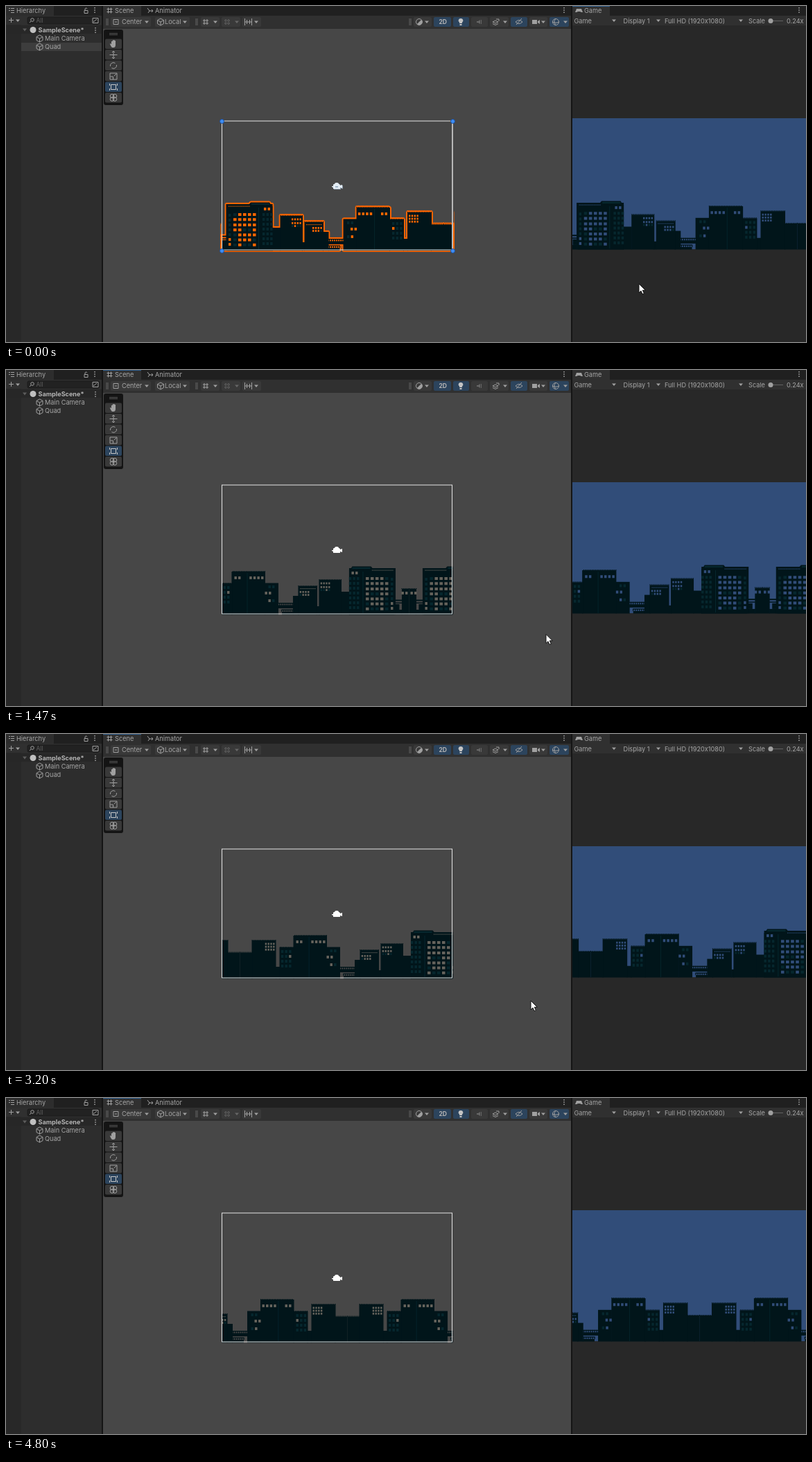
An HTML page with a canvas that plays this animation: 1154 px wide and 485 px high, repeating every 4.94 s.

```html
<!DOCTYPE html>
<html lang="en">
<head>
<meta charset="utf-8">
<title>Scrolling skyline in an editor</title>
<style>
html, body { margin: 0; width: 100%; height: 100%; overflow: hidden; background: #202020; }
svg, canvas { position: absolute; left: 0; top: 0; width: 1154px; height: 485px; display: block; }
text { font: 9.2px Inter, Roboto, sans-serif; fill: #a6a6a6; }
.bold { font-weight: 700; font-size: 9.1px; fill: #b4b4b4; }
.small { font-size: 8.5px; }
.line { fill: none; stroke: #a0a0a0; stroke-width: 1; }
.dim { opacity: .45; }
.icon { fill: #a0a0a0; }
.on { fill: #2c445d; }
.btn { fill: #393939; }
.picked .idle, body:not(.picked) .picked-only { display: none; }
</style>
</head>
<body class="picked">
<svg viewBox="0 0 1154 485">
  <defs>
    <path id="caret" class="icon" d="M-3-1.5h6L0 2z"/>
    <path id="kebab" class="icon" d="M-.8-4h1.6v1.6h-1.6zM-.8-.8h1.6v1.6h-1.6zM-.8 2.4h1.6v1.6h-1.6z"/>
    <path id="cube" class="line" d="M0-5 4.5-2.5v5L0 5l-4.5-2.5v-5zM-4.5-2.5 0 0l4.5-2.5M0 0v5"/>
    <path id="grid" class="line" d="M-2-4v8M2-4v8M-4-2h8M-4 2h8"/>
    <path id="cam" d="M-7-1h2v-2q0-1 2-1 0-2 3-2t3 2q2 0 2 2l3-1v5l-3-1v2h-10v-2l-2-1z"/>
  </defs>

  <!-- hierarchy -->
  <path fill="#2d2d2d" d="M0 0h138v485H0z"/>
  <path fill="#202020" d="M69 0h69v14H69z"/>
  <path fill="#303030" d="M0 14h138v13H0z"/>
  <path fill="#282828" d="M0 27h22v458H0z"/>
  <path fill="#272727" d="M0 28h138v12H0z"/>
  <path class="picked-only" fill="#3d3d3d" d="M22 53h116v12H22z"/>
  <path class="line" d="M4 3.5h2M7 3.5h5M4 6.5h2M7 6.5h5M7 9.5h5"/>
  <text x="15" y="10">Hierarchy</text>
  <path class="line" d="M113 6.5h5v4h-5zM114 6V4q1.5-2.5 3 0"/>
  <use href="#kebab" x="128" y="6"/>
  <path class="line" d="M4 20.5h7M7.5 17v7"/><use href="#caret" x="17" y="21"/>
  <rect x="31" y="16" width="104" height="10" rx="2" fill="#222" stroke="#1a1a1a"/>
  <path class="line" d="M34 24l2-2"/><circle class="line" cx="38" cy="20" r="2.3"/>
  <text x="43.5" y="24" class="dim small">All</text>
  <path class="line" d="M125 17.5h8v7h-8zM126 23l5-4"/>
  <path class="icon dim" d="M24 32.5h6l-3 4z"/>
  <circle cx="39" cy="34.5" r="4.5" fill="#c0c0c0"/>
  <text x="46.5" y="38" class="bold">SampleScene*</text>
  <use href="#kebab" x="129" y="35"/>
  <use href="#cube" x="48.5" y="47"/><text x="56" y="50">Main Camera</text>
  <use href="#cube" x="48.5" y="59"/><text x="56" y="62">Quad</text>

  <!-- scene -->
  <path fill="#474747" d="M140 32h675v453H140z"/>
  <path fill="#303030" d="M140 0h55v14h620v19H140z"/>
  <path class="idle" fill="#32608f" d="M140 0h55v1h-55z"/>
  <use href="#grid" x="149.5" y="6.5"/><text x="157" y="10">Scene</text>
  <path class="line" d="M204 3l3 4h4M207 7l-2 3M210 5l2 2-2 2"/><text x="215" y="10">Animator</text>
  <use href="#kebab" x="805" y="6"/>
  <g id="buttons"></g>
  <path class="line dim" d="M145 18v10M147 18v10M274 18v10M276 18v10M582 18v10M584 18v10"/>
  <path class="line" d="M155 19.5h7v7h-7zM157 23h3"/><text x="167" y="26">Center</text><use href="#caret" x="203" y="23"/>
  <use href="#cube" x="223" y="23"/><text x="229" y="26">Local</text><use href="#caret" x="258" y="23"/>
  <use href="#grid" x="288" y="23"/><use href="#caret" x="302" y="23"/>
  <use href="#grid" x="319" y="23" class="dim" stroke-dasharray="2 1"/><use href="#caret" x="333" y="23" class="dim"/>
  <path class="line" d="M344.5 18v10M354.5 18v10M347.5 20v6M351.5 20v6M345 23h9"/><use href="#caret" x="361" y="23"/>
  <circle class="line" cx="596" cy="23" r="4.5"/><path class="icon" d="M593 26a4 4 0 0 0 6-6z"/><use href="#caret" x="607" y="23"/>
  <text x="624.5" y="26" class="bold small">2D</text>
  <path fill="#c4c4c4" d="M656 18a3 3 0 0 1 2 5.5v1.500h-4v-1.500a3 3 0 0 1 2-5.500zM654.5 26h3v2h-3z"/>
  <path class="icon dim" d="M679 22h2l3-2v6l-3-2h-2zM685 20h1v6h-1z"/>
  <path class="line" d="M702 23l4-2 4 2-4 2zM702 25.5l4 2 4-2M707 19h4v3"/><use href="#caret" x="720" y="23"/>
  <path class="line" d="M735 23q5-5 10 0-5 5-10 0zM736 27l8-9"/>
  <path class="icon" d="M759 20h7v6h-7zM767 22l3-2v6l-3-2z"/><use href="#caret" x="775" y="23"/>
  <circle class="line" cx="793" cy="23" r="4.5"/><path class="line" d="M788 23q5 3 10 0M793 18q-4 5 0 10"/><use href="#caret" x="807" y="23"/>

  <!-- tool strip -->
  <rect x="141" y="34" width="28" height="109" rx="3" fill="#141414"/>
  <path class="line dim" d="M149 39.5h12M149 41.5h12"/>
  <g id="tools"></g>
  <path class="icon" d="M150 54l2 1v-4h1.5v-1.5h1.5v-.5h1.5v1h1.5v6q0 4-3 4h-2q-2-2-3-5z"/>
  <path class="line" d="M155 65v11M149.5 70.5h11M153 67l2-2 2 2M153 74l2 2 2-2"/>
  <path class="line" d="M150.5 87a4.5 4.5 0 0 1 7-4.5M159.5 85a4.5 4.5 0 0 1-7 4.5"/>
  <path class="line" d="M150 97h10v9h-10zM150.5 102h4v4M156 101l3-3"/>
  <path fill="none" stroke="#c8c8c8" d="M151.5 113.5h7v7h-7zM149.5 112v3M160.5 112v3M149.5 119v3M160.5 119v3"/>
  <circle class="line" cx="153" cy="130" r="2.8"/><circle class="line" cx="157" cy="130" r="2.8"/>
  <circle class="line" cx="153" cy="134.5" r="2.8"/><circle class="line" cx="157" cy="134.5" r="2.8"/>

  <!-- game -->
  <path fill="#282828" d="M817 28h337v457H817z"/>
  <path fill="#314d79" d="M817 162h337v189H817z"/>
  <path fill="#303030" d="M817 0h54v14h283v14H817z"/>
  <path class="picked-only" fill="#32608f" d="M817 0h54v1h-54z"/>
  <path class="icon" d="M823 4h7l2 5h-2l-2-1h-3l-2 1h-2z"/><text x="834" y="10">Game</text>
  <use href="#kebab" x="1144" y="6"/>
  <text x="819.5" y="24.5">Game</text><use href="#caret" x="877" y="21"/>
  <text x="890.5" y="24.5">Display 1</text><use href="#caret" x="941" y="21"/>
  <text x="950" y="24.5">Full HD (1920x1080)</text><use href="#caret" x="1060" y="21"/>
  <text x="1071" y="24.5">Scale</text>
  <path class="line dim" d="M1100 21.5h21"/><circle class="icon" cx="1103" cy="21.5" r="3.5"/>
  <text x="1126" y="24.5">0.24x</text>
  <path fill="#151515" d="M138 0h2v485h-2zM815 0h2v485h-2z"/>

  <use href="#cam" x="477" y="261" fill="#fff" class="idle"/>
  <g class="picked-only">
    <use href="#cam" x="478" y="262" fill="#8593a2"/>
    <use href="#cam" x="477" y="261" fill="#e4edf5"/>
    <path fill="#9fb4c8" d="M475 260h4v2h-4z"/>
  </g>
</svg>
<canvas id="stage" width="1154" height="485"></canvas>
<script>
const ctx = document.getElementById('stage').getContext('2d');
const TILE = 333, BASE = 353.5;
const BODY = '#01151a', FAINT = '#06272e', ORANGE = '#ff6600';

function addButton(id, x, y, w, h, on) {
  document.getElementById(id).innerHTML +=
    `<rect class="${on ? 'on' : 'btn'}" x="${x}" y="${y}" width="${w}" height="${h}" rx="2"/>`;
}
for (const [x, w] of [[151, 58], [215, 50], [281, 27], [311, 27], [341, 27], [588, 26],
  [671, 24], [698, 27], [755, 26]]) addButton('buttons', x, 16, w, 14);
for (const [x, w] of [[617, 25], [645, 23], [728, 24], [784, 28]]) addButton('buttons', x, 16, w, 14, true);
for (let i = 0; i < 6; i++) addButton('tools', 143, 47.5 + i * 15.5, 24, 14.5, i === 4);

// left, right, top
const plain = [
  [10, 20, 346], [21, 86.5, 289], [19.5, 86.5, 286], [86, 98, 320], [129, 133, 341],
  [159, 167.5, 326], [167, 183.5, 349], [188.5, 208, 307.5], [275, 281.5, 336]
];
const dotted = [
  [0, 10.5, 316], [97.5, 130, 303], [132.5, 160, 312], [207.5, 256, 291],
  [255, 276, 308], [281, 316, 298], [315, TILE, 315.5]
];

// left, top, columns, rows, lit share
const wide = [[30, 299, 5, 2, .95], [30, 314, 5, 5, .68]];
const medium = [
  [2, 320, 2, 1, 1], [74, 291, 2, 1, 1], [72, 299, 3, 7, 0], [23, 300, 1, 5, .2],
  [23, 335, 1, 2, 1], [194, 311, 2, 1, 0], [199, 320, 2, 1, 1], [194, 331, 2, 1, .6],
  [210, 298, 4, 1, 1], [243, 298, 2, 1, 1], [259, 312, 3, 4, .2]
];
const small = [
  [114, 306.5, 4, 1, 1], [114, 312, 4, 2, .7], [144, 319, 4, 2, .8], [283, 301.5, 4, 3, 1]
];
const specks = [[23, 288.5, 15, 1, 1], [135, 315, 11, 1, 1]];

function random(seed) {
  const v = Math.sin(seed * 91.7) * 43758.5;
  return v - Math.floor(v);
}

function row(from, to, gap, y, w, h) {
  for (let x = from; x < to; x += gap) ctx.fillRect(x, y, w, h);
}

function silhouette() {
  for (const [a, b, top] of plain.concat(dotted)) ctx.fillRect(a, top, b - a, BASE - top);
  for (const [a, b, top] of dotted) row(a, b - .5, 2.4, top - 1, 1.3, 1);
  // raised roof
  ctx.beginPath();
  ctx.moveTo(52, 287);
  ctx.lineTo(55, 283.5);
  ctx.lineTo(82, 283.5);
  ctx.lineTo(86, 290);
  ctx.fill();
  // railings
  ctx.fillRect(10, 331.5, 10, 2);
  ctx.fillRect(10, 335.5, 10, 1.5);
  ctx.fillRect(14, 338, 6, 8);
  ctx.fillRect(167, 336, 22, 1.3);
  ctx.fillRect(167, 339.5, 22, 4.5);
  ctx.fillRect(167, 345.5, 17, 1.2);
  row(168, 188, 3, 336, 1.2, 4);
  row(168, 184, 3, 346, 1.2, 3);
}

function panes(groups, light, dx, dy, w, h) {
  for (const [x, y, cols, rows, share] of groups) {
    for (let i = 0; i < cols * rows; i++) {
      ctx.fillStyle = random(x + y * 3 + i) < share ? light : FAINT;
      ctx.fillRect(x + i % cols * dx, y + Math.floor(i / cols) * dy, w, h);
    }
  }
}

function city(light) {
  ctx.fillStyle = BODY;
  silhouette();
  ctx.fillStyle = FAINT;
  ctx.fillRect(56, 285, 26, 2);
  ctx.fillRect(66, 291, 1, 60);
  ctx.fillRect(233, 293, .8, 59);
  panes(wide, light, 7, 7.2, 4.5, 4);
  panes(medium, light, 5.6, 7, 3.4, 4);
  panes(small, light, 3.8, 4.2, 2.4, 2.8);
  panes(specks, light, 2.1, 1, 1.1, 1.2);
}

// Mirrored repeat: every other tile is flipped
function tiles(scroll, paint) {
  const first = Math.floor(scroll / TILE);
  for (let k = first - 1; k <= first + 1; k++) {
    const flip = k & 1;
    ctx.save();
    ctx.translate((k + flip) * TILE - scroll, 0);
    if (flip) ctx.scale(-1, 1);
    paint();
    ctx.restore();
  }
}

function clipped(x, y, w, h, paint) {
  ctx.save();
  ctx.beginPath();
  ctx.rect(x, y, w, h);
  ctx.clip();
  paint();
  ctx.restore();
}

function outline(scroll) {
  ctx.fillStyle = ORANGE;
  for (let a = 0; a < 6.2; a += Math.PI / 4) {
    ctx.save();
    ctx.translate(311.5 + 1.8 * Math.cos(a), 1.8 * Math.sin(a) - .3);
    tiles(scroll, silhouette);
    ctx.restore();
  }
}

function handle(x, y) {
  ctx.beginPath();
  ctx.arc(x, y, 3, 0, 7);
  ctx.fillStyle = '#3d8df5';
  ctx.fill();
  ctx.strokeStyle = '#1d4f9c';
  ctx.stroke();
}

function scene(scroll, picked) {
  if (picked) clipped(309.5, 160, 337, 196, () => outline(scroll));
  clipped(311, 160, 333.5, 193.5, () => {
    ctx.translate(311.5, 0);
    tiles(scroll, () => city(picked ? ORANGE : '#66635c'));
  });
  ctx.lineWidth = 1;
  ctx.strokeStyle = '#e6e6e6';
  ctx.strokeRect(311.5, 166, 332, 186);
  if (!picked) return;
  ctx.fillStyle = '#b8b8b8';
  ctx.fillRect(643, 166, 2, 187);
  for (const x of [311.5, 644.5]) for (const y of [166.5, 353.5]) handle(x, y);
}

function game(scroll) {
  clipped(817, 162, 337, 189.5, () => {
    ctx.translate(817, 351);
    ctx.scale(1.015, 1.015);
    ctx.translate(0, -352);
    tiles(scroll, () => city('#314d79'));
  });
}

const arrow = new Path2D('M0 0v13l3-2.8 2 4.6 2.3-1-2-4.5h4z');
function cursor(x, y) {
  ctx.save();
  ctx.translate(x, y);
  ctx.fillStyle = '#fff';
  ctx.strokeStyle = '#111';
  ctx.fill(arrow);
  ctx.stroke(arrow);
  ctx.restore();
}

// seconds, then value or x and y
const scrollKeys = [[0, 13.5], [.312, 13.5], [1, 242.5], [1.933, 549.5], [2.4, 705],
  [3.2, 973], [3.8, 1173], [4.8, 1484]];
const pointerKeys = [[0, 913, 401], [.07, 913, 401], [.4, 796, 383], [.6, 788, 382],
  [1, 787, 382], [1.933, 771, 381], [2.4, 762, 379], [2.67, 760, 387], [3.2, 757, 385],
  [3.8, 756.5, 385], [4, 600, 215], [4.13, 400, 138], [4.267, 233, 284],
  [4.4, 67, 470], [4.46, 40, 500]];

function at(keys, t, i = 1) {
  const n = keys.findIndex(k => k[0] > t);
  if (n < 0) return keys[keys.length - 1][i];
  const a = keys[n - 1], b = keys[n];
  return a[i] + (b[i] - a[i]) * (t - a[0]) / (b[0] - a[0]);
}

const start = performance.now();
function draw() {
  const ms = (performance.now() - start) % 4940;
  // The picture advances 15 times a second
  const step = Math.min(72, Math.floor((ms + 5) * .015));
  const t = step / 15, picked = step < 6;
  const scroll = at(scrollKeys, t);
  document.body.classList.toggle('picked', picked);
  ctx.clearRect(0, 0, 1154, 485);
  scene(scroll, picked);
  game(scroll);
  cursor(at(pointerKeys, t), at(pointerKeys, t, 2));
  requestAnimationFrame(draw);
}
draw();
</script>
</body>
</html>
```
